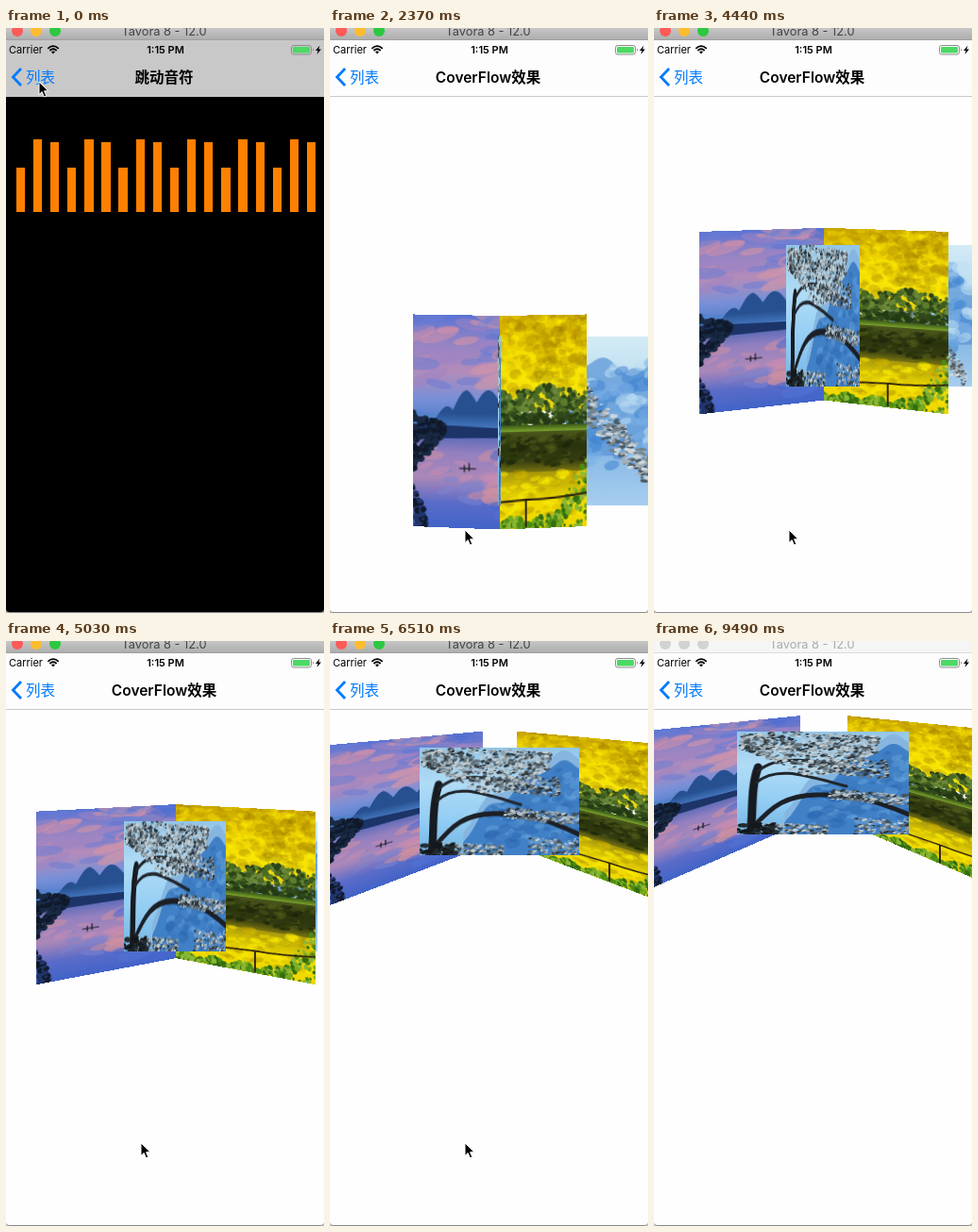
These frames come from a looping animation (337 by 620 pixels, 9590 ms). An HTML page with a canvas:

```html
<!DOCTYPE html>
<html lang="zh">
<head>
<meta charset="utf-8">
<title>CoverFlow效果</title>
<style>
html, body { margin: 0; width: 100%; height: 100%; overflow: hidden; background: #fefefe; }
#stage { position: absolute; left: 0; top: 0; width: 337px; height: 620px; overflow: hidden;
  background: #fefefe; color: #000; font: 15.5px Inter, "Noto Sans CJK SC", "Noto Sans CJK", sans-serif; }
#stage * { box-sizing: border-box; white-space: nowrap; }
#stage div, #stage svg, #stage canvas { position: absolute; }
.screen { left: 0; top: 72px; width: 337px; height: 547px; background: #fefefe; }
.row { left: 0; width: 337px; height: 39.9px; line-height: 39.9px; padding-left: 12px; }
.row::after { content: ""; position: absolute; left: 12px; right: 0; bottom: 0; height: 1px; background: #dedee0; }
#bars { background: #000; }
.note { width: 9.3px; background: #ff8000; }
#nav { left: 0; top: 13px; width: 337px; height: 60px; border-bottom: 1px solid #c9c9cb; }
.title { left: 0; width: 335px; top: 29.5px; line-height: 20px; text-align: center; font-weight: 600; }
#back { left: 21px; top: 29.5px; line-height: 20px; color: #007aff; }
.status { top: 3px; line-height: 14px; font-size: 11px; }
#window { left: 0; top: 0; width: 337px; height: 13px; overflow: hidden;
  background: linear-gradient(#c6c6c6, #aeaeae); border-bottom: 1px solid #a0a0a0; color: #444; }
#window b { position: absolute; top: -3px; width: 12px; height: 12px; border-radius: 50%; }
#window div { left: 0; width: 335px; top: -5px; line-height: 18px; font-size: 12.8px; text-align: center; }
#window.idle { background: #f5f5f5; border-color: #dcdcdc; color: #aaa; }
#window.idle b { background: #d2d2d2 !important; }
#edge { left: 0; top: 0; width: 337px; height: 620px; border-bottom: 1px solid #8b8b8b; border-radius: 0 0 4px 4px; box-shadow: 0 0 0 6px #b4b4b4; }
</style>
</head>
<body>
<div id="stage">
  <div id="list" class="screen"></div>
  <div id="bars" class="screen"></div>
  <div id="flow" class="screen"><canvas id="art" width="337" height="547"></canvas></div>
  <div id="nav">
    <div class="status" style="left:3px">Carrier</div>
    <div class="status" style="left:0;width:338px;text-align:center;font-weight:600">1:15 PM</div>
    <svg width="337" height="20" style="left:0;top:0" fill="none">
      <g stroke="#000" stroke-width="1.8">
        <path d="M44.3 8.8Q50 3.4 55.7 8.8M46.4 11Q50 7.6 53.6 11"/>
        <path d="M48 12.2Q50 10.6 52 12.2L50 14.4Z" fill="#000" stroke="none"/>
      </g>
      <rect x="302.5" y="5.5" width="21" height="9.5" rx="2.4" stroke="#8b8b8b"/>
      <rect x="304" y="7" width="18" height="6.5" rx="1.2" fill="#4cd964"/>
      <path d="M325 8.6Q327 10.2 325 12Z" fill="#8b8b8b"/>
      <path d="M332.5 5.5L328 11H330.6L329.4 15L334 9.4H331.3Z" fill="#000"/>
    </svg>
    <svg id="chevron" width="20" height="24" style="left:0;top:27px"><path d="M16 3L7.4 12L16 21" fill="none" stroke="#007aff" stroke-width="2.8"/></svg>
    <div id="back">列表</div>
    <div id="barsTitle" class="title">跳动音符</div>
    <div id="listTitle" class="title">列表</div>
    <div id="flowTitle" class="title">CoverFlow效果</div>
  </div>
  <div id="window">
    <b style="left:6px;background:#fc5b57"></b><b style="left:26px;background:#fdbc2f"></b><b style="left:46px;background:#2bc840"></b>
    <div>Tavora 8 - 12.0</div>
  </div>
  <div id="edge"></div>
  <svg id="cursor" width="14" height="20" style="left:-1px;top:-1px"><path d="M1 1V14.6L4.2 11.6L6.4 17L8.8 16L6.6 10.8H11Z" fill="#000" stroke="#fff" stroke-width="1"/></svg>
</div>
<script>
const LOOP = 9590, STEP = 148, W = 337, TOP = 72, CARD = 164, MIRROR = 359;
const $ = id => document.getElementById(id);
const clamp = v => Math.min(1, Math.max(0, v));
const mix = (a, b, k) => a + (b - a) * k;
const easeOut = v => 1 - (1 - clamp(v)) ** 3;
const easeInOut = v => .5 - .5 * Math.cos(Math.PI * clamp(v));

let seed = 7;
const rnd = (a, b) => mix(a, b, (seed = seed * 16807 % 2147483647) / 2147483647);
const at = (v, x) => typeof v === 'function' ? v(x) : v;

// Painting helpers; y limits may be numbers or functions of x.
function picture(w, h, paint) {
  const c = document.createElement('canvas');
  c.width = w; c.height = h;
  const g = c.getContext('2d');
  const fade = (y0, y1, ...cols) => {
    const f = g.createLinearGradient(0, y0, 0, y1);
    cols.forEach((col, i) => f.addColorStop(i / (cols.length - 1), col));
    g.fillStyle = f;
    g.fillRect(0, y0, w, y1 - y0);
  };
  const ridge = (col, x0, x1, top, base) => {
    g.fillStyle = col;
    for (let x = x0; x < x1; x++) g.fillRect(x, at(top, x), 1.3, at(base, x) - at(top, x));
  };
  const dabs = (n, cols, x0, x1, y0, y1, size, flat = .45) => {
    for (let i = 0; i < n; i++) {
      const x = rnd(x0, x1), r = rnd(size / 3, size);
      g.fillStyle = cols[i % cols.length];
      g.beginPath();
      g.ellipse(x, rnd(at(y0, x), at(y1, x)), r, r * flat, rnd(-.4, .2), 0, 7);
      g.fill();
    }
  };
  const line = (col, width, path) => {
    g.strokeStyle = col; g.lineWidth = width; g.lineCap = 'round';
    g.stroke(new Path2D(path));
  };
  paint({ fade, ridge, dabs, line });
  return c;
}

const lake = picture(CARD, 200, ({ fade, ridge, dabs, line }) => {
  fade(0, 106, '#5a74d4', '#9484c4', '#b48cba', '#7890d8', '#4a78c8');
  dabs(50, ['#d890a888', '#6a7cd488', '#dc98a488', '#a084c488'], 0, 140, 0, 66, 26, .28);
  dabs(18, ['#4c6cd066', '#6c84d866'], 70, CARD, 0, 72, 24, .3);
  const peaks = x => 100 - 18 * clamp((x - 22) / 35) - 12 * Math.abs(Math.sin(x / 8 + 1)) * clamp((x - 20) / 20)
    + 8 * clamp((x - 100) / 60);
  ridge('#5484cc', 0, CARD, x => 90 + 4 * Math.sin(x / 20), 106);
  ridge('#26508f', 20, CARD, peaks, 104);
  fade(92, 108, '#4a80cc00', '#4a7cc4');
  fade(106, 200, '#4262b4', '#9480c0', '#ac88b8', '#5a6cc8', '#4264c8');
  dabs(36, ['#d090a088', '#7c84d088', '#c88cb088'], 14, 120, 120, 176, 20, .3);
  dabs(22, ['#4468d088', '#5474d488'], 90, CARD, 112, 200, 24, .4);
  ridge('#1c3468', 0, CARD, x => 103 + x / 40, x => 117 - x / 35);
  dabs(130, ['#101a2c', '#1a2a44'], 0, 34, x => 92 + x / 3, x => 148 - x * 1.1, 5, .7);
  dabs(50, ['#101a2c', '#22366c'], 0, 14, x => 160 + x * 2, 200, 4, .8);
  line('#15141c', 1.2, 'M50 144H67M55 141V147M60 139V146');
});

const grove = picture(CARD, 200, ({ fade, dabs, line }) => {
  fade(0, 90, '#c8a400', '#ecd000', '#f6e40a', '#e8d20c');
  dabs(420, ['#a8840044', '#fff00066', '#98780033', '#f8dc0066'], 0, CARD, 0, 74, 7, .7);
  dabs(50, ['#8c6c0044', '#b0900055'], 105, CARD, 0, 60, 8, .7);
  const crown = x => 70 + 3 * Math.sin(x / 11) + 2 * Math.sin(x / 4);
  dabs(520, ['#3f5c20', '#5c7c2c', '#2c4418', '#6c8838', '#4a6a24'], 0, CARD, crown, 102, 4, 1);
  dabs(140, ['#243a14', '#30481c'], 0, CARD, 92, 104, 4, .7);
  fade(103, 109, '#3c5a18', '#7ca42c');
  fade(109, 150, '#4c5a1c', '#2a340e', '#343c10', '#8c8410');
  dabs(160, ['#18200a88', '#525c1c88', '#2c380e88'], 0, CARD, 113, 143, 6, .5);
  fade(147, 200, '#a8980c', '#f0dc00', '#f0d800');
  dabs(150, ['#fff00077', '#b0940066', '#d8bc0077'], 0, CARD, 147, 188, 8, .45);
  const bank = x => 192 - 62 * clamp((x - 118) / 46) ** 1.6 + 3 * Math.sin(x / 5);
  dabs(380, ['#4c8c14', '#78ac20', '#346c10', '#8cb838'], 0, CARD, bank, 200, 3, 1.2);
  line('#302510', 2, `M0 179Q50 176 99 173Q130 173 ${CARD} 168M99 173V198`);
});

const pine = picture(182, 109, ({ fade, ridge, dabs, line }) => {
  const leaf = ['#c4d0d6', '#46545c', '#92a0a8', '#64727a', '#b0bcc4', '#2c363c'];
  fade(0, 109, '#94c6e8', '#b0dcf6', '#94cef4', '#74b4e4');
  const hill = x => 92 - 74 * clamp((x - 50) / 95) ** .8 + 5 * Math.sin(x / 7);
  ridge('#86b6e0', 50, 182, x => hill(x) - 10, 109);
  ridge('#4080c6', 50, 182, hill, 109);
  dabs(120, ['#2c68b088', '#64a2dc88', '#3c78c088'], 80, 182, x => hill(x) + 4, 98, 9, .5);
  line('#171b20', 9, 'M14 109C17 85 14 60 22 38');
  line('#1c2026', 5, 'M18 100C38 78 52 68 84 67S140 70 182 88');
  line('#20262c', 3, 'M20 54C42 36 70 46 116 58M22 42C42 24 75 28 150 44');
  const under = x => 20 + 26 * Math.sin(Math.PI * clamp(x / 165)) ** 2;
  dabs(850, leaf, 4, 150, x => Math.abs(x - 60) / 18, under, 3.4);
  dabs(200, leaf, 92, 160, 30, x => 44 + (x - 92) / 10, 3);
  dabs(230, leaf, 98, 182, x => 54 + x / 14, x => 63 + x / 12, 3);
  dabs(120, leaf, 125, 182, 92, 109, 3);
  dabs(150, leaf, 25, 95, x => 94 + x / 16, 109, 3);
  dabs(60, ['#14181c', '#242c30'], 0, 40, 98, 109, 5);
});

const mist = picture(130, 170, ({ fade, ridge, dabs }) => {
  fade(0, 170, '#d4ecf6', '#b8daf0', '#86b8e4', '#a8cef0');
  ridge('#5c96d8aa', 0, 130, x => 22 + x / 6 + 7 * Math.sin(x / 8), 120);
  dabs(110, ['#4084d088', '#78aee488', '#c0e0f488'], 0, 130, 26, 130, 13, .6);
  dabs(420, ['#d0d8dc', '#76848c', '#a4b0b8', '#4c5860'], 0, 108, x => 22 + x * 1.2, x => 68 + x, 4);
});

const art = $('art').getContext('2d');
art.translate(0, -TOP);

function sideCard(pic, q, flip) {
  const outer = mix(89, -8, q), outTop = mix(307, 95, q), inTop = mix(310, 79, q);
  const outBot = outTop + 169 + 57 * (1 - q) ** 1.5, inBot = mix(540, 193, q);
  for (let x = 0; x < W; x++) {
    const u = (flip ? MIRROR - x : x) - outer, s = u / CARD;
    if (x >= 180 !== flip || s < 0 || u >= CARD - 1) continue;
    const top = mix(outTop, inTop, s), bot = mix(outBot, inBot, s);
    art.drawImage(pic, flip ? CARD - 1 - u : u, 0, 1, 200, x, top, 1, bot - top);
  }
}

function drawFlow(t) {
  const q = easeInOut((t - 1910) / 5560);
  const half = 91 * q, top = mix(331, 96, q), high = mix(511, 205, q) - top;
  art.clearRect(0, TOP, W, 620);
  art.drawImage(mist, 250, top, mix(140, 40, q), high);
  sideCard(lake, q, false);
  sideCard(grove, q, true);
  art.drawImage(pine, 179.2 - half, top, half * 2, high);
}

const add = (parent, cls, css, text = '') => {
  const el = document.createElement('div');
  el.className = cls;
  el.style.cssText = css;
  el.textContent = text;
  return $(parent).appendChild(el);
};
const names = ['CALayer层', '水纹', '渐进圆环', '大火', '霓虹', '大雪', '扫描', '跳动', '图表', '公转', '音符', 'coverFlow'];
const rows = Array.from({ length: 13 }, (_, i) =>
  add('list', 'row', `top:${39.9 * i - .2}px`, names[i] ? names[i] + '动画' : ''));
const notes = Array.from({ length: 18 }, (_, i) => add('bars', 'note', `left:${10.7 + 18.13 * i}px`));
const phases = [-.58, 1.25, .93];

const move = (id, x, y = 0) => $(id).style.transform = `translate(${x}px,${y}px)`;
const place = (id, x, alpha) => { move(id, x); $(id).style.opacity = alpha; };

function pointerAt(t) {
  const e = easeInOut((t - 600) / 580), out = Math.max(0, t - 7000);
  if (t < 1480) return [mix(35, 129, e), mix(57, 516, e)];
  return [143 + out * .6, 532 + out * .14];
}

function render(t) {
  const pop = easeOut((t - 280) / 500), push = easeOut((t - 1850) / 500);
  const away = 1 - pop + push;
  move('list', -100 * away);
  move('bars', W * pop);
  move('flow', W * (1 - push));
  place('barsTitle', 150 * pop, 1 - pop);
  place('listTitle', -120 * away, 1 - away);
  place('flowTitle', 150 * (1 - push), push);
  place('back', 120 * (1 - away), away);
  $('chevron').style.opacity = away;
  const tone = Math.round(mix(200, 253, pop));
  $('nav').style.background = `rgb(${tone},${tone},${tone})`;
  rows[10].style.background = `rgba(217,217,217,${1 - pop})`;
  rows[11].style.background = t >= 1776 ? '#d9d9d9' : '';
  notes.forEach((n, i) => {
    const h = 58 + 20 * Math.sin(phases[i % 3] + t / 160);
    n.style.height = h + 'px';
    n.style.top = 123.3 - h + 'px';
  });
  if (push > 0) drawFlow(t);
  move('cursor', ...pointerAt(t));
}

const start = performance.now();
let last = -1;
function frame() {
  const now = (performance.now() - start) % LOOP;
  const t = Math.floor((now + 6) / STEP) * STEP;
  if (t !== last) render(last = t);
  $('window').className = now >= 9490 ? 'idle' : '';
  requestAnimationFrame(frame);
}
frame();
</script>
</body>
</html>
```
